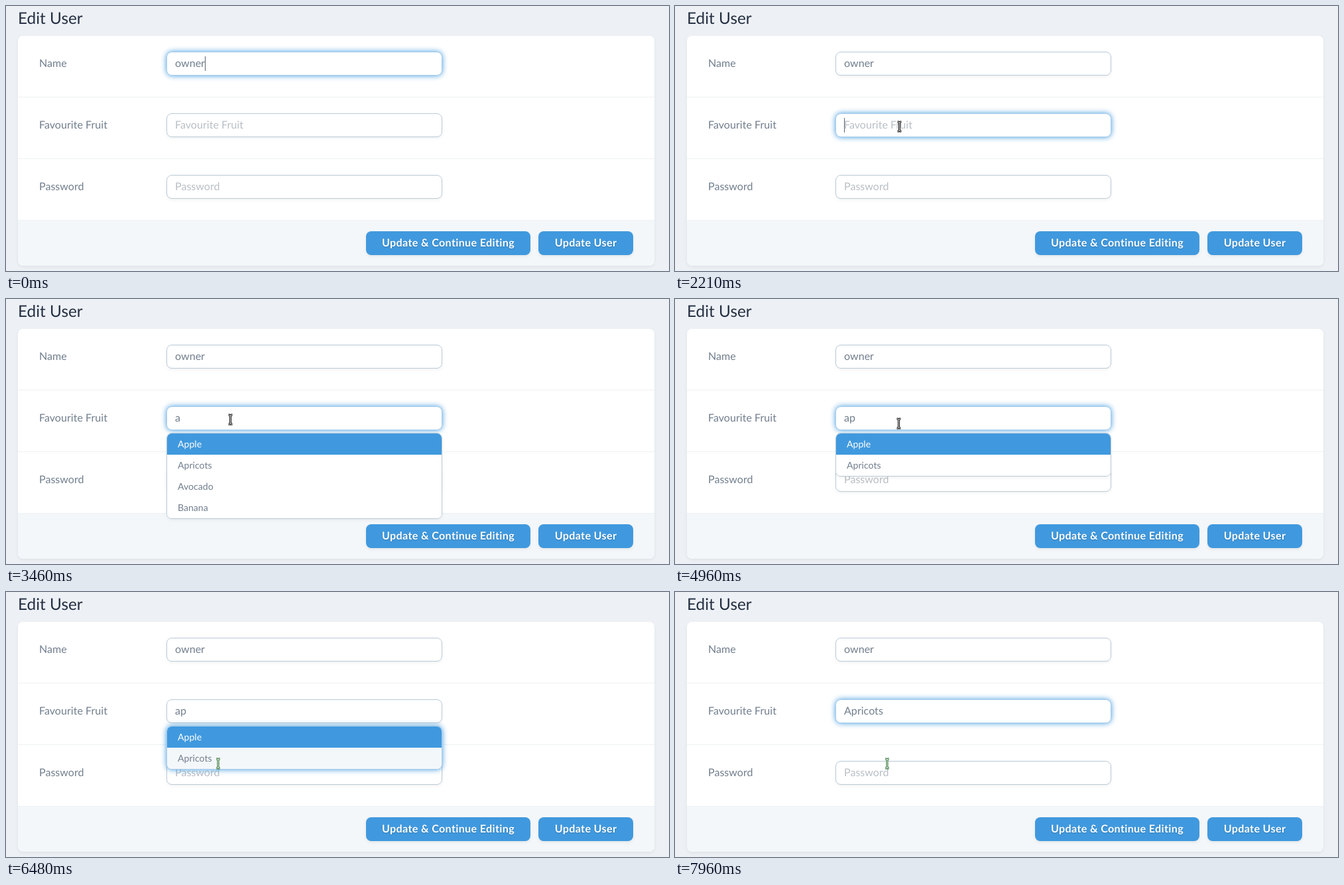
Animation, 1000 px wide and 400 px high, one loop 8000 ms. Source, as an HTML page:

```html
<!DOCTYPE html>
<html lang="en">
<head>
<meta charset="utf-8">
<title>Edit User</title>
<style>
  html, body { margin: 0; height: 100%; overflow: hidden; background: #edf1f5; }
  svg { display: block; font: 16.1px Lato, "Open Sans", sans-serif; text-rendering: geometricPrecision; }
  text { fill: #727f8e; white-space: pre; }
  .title { font-size: 24.4px; fill: #252f42; }
  .card { fill: #fff; filter: drop-shadow(0 2px 2px rgba(0, 0, 0, .06)); }
  .footer { fill: #f4f7fa; }
  .line { stroke: #edf1f4; }
  .box { fill: #fff; stroke: #bacad6; filter: drop-shadow(0 2px 2px rgba(0, 0, 0, .05)); }
  .focus { stroke: #a9cdea; filter: drop-shadow(0 0 4px #4099de); }
  .placeholder { fill: #b9bfc5; }
  .button rect { fill: #4099de; filter: drop-shadow(0 2px 2px rgba(0, 0, 0, .07)); }
  .button text { fill: #fff; font-weight: 700; letter-spacing: .35px; text-anchor: middle; text-shadow: 0 1px 2px rgba(0, 0, 0, .2); }
  #list text { font-size: 14.1px; }
  #list .selected { fill: #4099de; }
  #list .hover { fill: #f4f7fa; }
  #list .light { fill: #fff; }
  #caret { fill: #59636e; }
  #cursor path { stroke-linejoin: round; }
</style>
</head>
<body>
<svg id="stage" width="1000" height="400" viewBox="0 0 1000 400">
  <text class="title" x="18" y="27">Edit User</text>
  <rect class="card" x="18" y="45" width="960" height="347" rx="8"/>
  <path class="footer" d="M18 323H978V384a8 8 0 0 1-8 8H26a8 8 0 0 1-8-8z"/>
  <path class="line" d="M18 137.5H978M18 230.5H978M18 323.5H978"/>
  <g id="form"></g>
  <g class="button">
    <rect x="543" y="340" width="248" height="36" rx="8"/>
    <text x="667" y="363">Update &amp; Continue Editing</text>
    <rect x="803" y="340" width="143" height="36" rx="8"/>
    <text x="874.5" y="363">Update User</text>
  </g>
  <g id="list">
    <clipPath id="listClip"><rect id="clipBox" x="243" y="203" width="414" rx="7"/></clipPath>
    <rect id="listBox" class="box" x="242.5" y="202.5" width="415" rx="7.5"/>
    <g id="items" clip-path="url(#listClip)"></g>
  </g>
  <rect id="caret" width="1" height="22"/>
  <g id="cursor"></g>
</svg>
<script>
const DURATION = 8000;
const FIELDS = ["Name", "Favourite Fruit", "Password"];
const FRUITS = ["Apple", "Apricots", "Avocado", "Banana"];
const INK = "#000", GREEN = "#1f6a25";
const $ = id => document.getElementById(id);

// Each step changes only the listed parts of the state.
const STEPS = [
  [0, { focus: 0, fruit: "", caret: true, rows: 0, hover: false, cursor: null, ink: INK }],
  [250, { cursor: ["arrow", 811, 205] }],
  [470, { cursor: ["beam", 427, 179] }],
  [720, { cursor: ["beam", 341, 185], caret: false }],
  [970, { cursor: ["beam", 338.5, 182] }],
  [1970, { cursor: ["beam", 344.5, 184], caret: true }],
  [2210, { cursor: ["beam", 338.5, 182], focus: 1 }],
  [2960, { fruit: "a" }],
  [3210, { caret: false }],
  [3460, { rows: 4 }],
  [3720, { fruit: "ap", caret: true }],
  [4210, { rows: 2 }],
  [4460, { caret: false }],
  [4960, { cursor: ["beam", 337.5, 188] }],
  [5210, { cursor: ["beam", 320, 219] }],
  [5460, { cursor: ["hand", 320, 224], ink: GREEN }],
  [5710, { cursor: ["hand", 320, 254], caret: true, hover: true }],
  [6480, { cursor: ["beam", 320, 259], caret: false, focus: "list" }],
  [6710, { fruit: "Apricots", caret: true, rows: 0, focus: 1 }],
  [7960, { caret: false }]
];

const BEAM = "M-3-7h2l1 1l1-1h2M0-6V6M-3 7h2l1-1l1 1h2";
const CURSORS = {
  arrow: ink => `<path d="M.5.5V17l4-3.5 2.8 6.5 2.7-1.2-2.8-6.3H12.5z" fill="#fff" stroke="${ink}"/>`,
  beam: ink => `<path d="${BEAM}" fill="none" stroke="${ink}" stroke-width="3"/>
    <path d="${BEAM}" fill="none" stroke="#fff"/>`,
  hand: ink => `<path d="M-1.5 12V2q1.5-3 3 0V7q2-1 3.2.8 2-.8 3.2 1 2.6-.6 2.6 2V14l-2 5.5H0L-5.5 11q1-2.5 4 1z" fill="#fff" stroke="${ink}"/>`
};

$("form").innerHTML = FIELDS.map((label, i) => {
  const y = 69 + 93 * i;
  return `<text x="50" y="${y + 23}">${label}</text>
    <rect class="box" x="242.5" y="${y + .5}" width="415" height="35" rx="7.5"/>
    <text class="value" x="255" y="${y + 23}"></text>`;
}).join("");
$("items").innerHTML = FRUITS.map((name, i) =>
  `<rect x="243" y="${203 + 32 * i}" width="414" height="32" fill="#fff"/>
   <text x="259" y="${224 + 32 * i}">${name}</text>`).join("");

const boxes = document.querySelectorAll("#form .box");
const values = document.querySelectorAll(".value");
const rows = document.querySelectorAll("#items rect");
document.querySelector("#items text").classList.add("light");
rows[0].classList.add("selected");

const show = (node, on) => node.setAttribute("visibility", on ? "visible" : "hidden");

function draw(state) {
  ["owner", state.fruit, ""].forEach((text, i) => {
    values[i].textContent = text || FIELDS[i];
    values[i].classList.toggle("placeholder", !text);
    boxes[i].classList.toggle("focus", state.focus === i);
  });

  show($("list"), state.rows);
  $("listBox").setAttribute("height", 32 * state.rows + 1);
  $("clipBox").setAttribute("height", 32 * state.rows);
  $("listBox").classList.toggle("focus", state.focus === "list");
  rows[1].classList.toggle("hover", state.hover);

  show($("caret"), state.caret);
  if (state.caret) {
    const value = values[state.focus];
    const empty = value.classList.contains("placeholder");
    $("caret").setAttribute("x", 255 + (empty ? 0 : Math.round(value.getComputedTextLength())));
    $("caret").setAttribute("y", 76 + 93 * state.focus);
  }

  show($("cursor"), state.cursor);
  if (state.cursor) {
    const [kind, x, y] = state.cursor;
    $("cursor").innerHTML = CURSORS[kind](state.ink);
    $("cursor").setAttribute("transform", `translate(${x} ${y})`);
  }
}

function frame() {
  const time = performance.now() % DURATION;
  draw(Object.assign({}, ...STEPS.filter(([start]) => start <= time).map(([, change]) => change)));
  requestAnimationFrame(frame);
}
frame();
</script>
</body>
</html>
```
